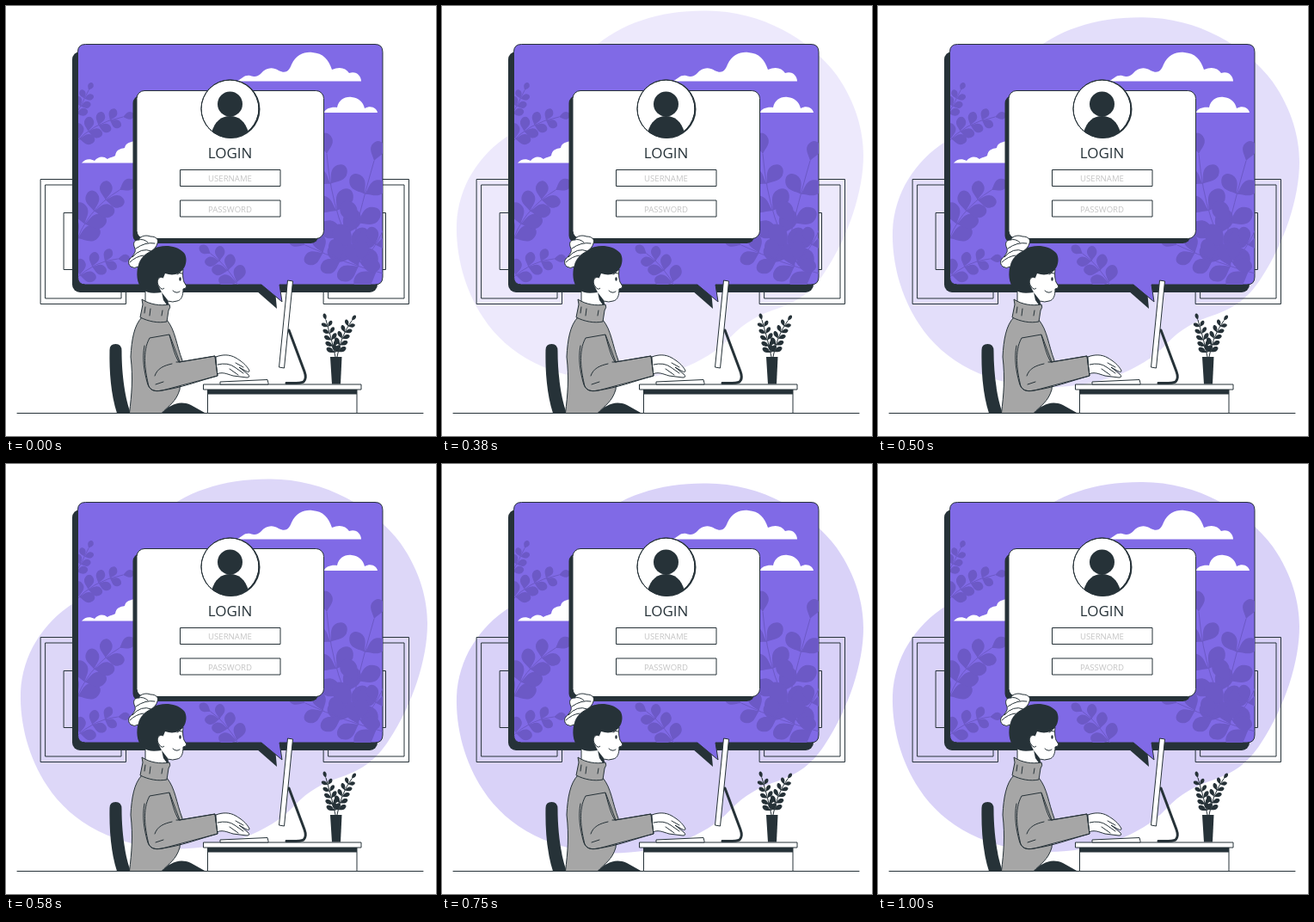
Animation of 500 by 500 pixels, one loop 1040 ms. Source, as an HTML page:

```html
<!DOCTYPE html>
<html lang="en">
<head>
<meta charset="utf-8">
<title>Login</title>
<style>
  html, body { margin: 0; width: 100%; height: 100%; overflow: hidden; background: #fff; }
  svg { display: block; width: 100%; height: 100%; }
  text { font-family: "Open Sans", "Noto Sans", sans-serif; font-stretch: 75%; text-anchor: middle; }
  .line { fill: none; stroke: #263238; stroke-linecap: round; stroke-linejoin: round; }
  .paper { fill: #fff; stroke: #263238; stroke-linejoin: round; }
  .wool { fill: #a6a6a6; stroke: #263238; stroke-linejoin: round; }
  .dark { fill: #263238; }
  .hint { font-size: 9.6px; fill: #c4c4c4; }
</style>
</head>
<body>
<svg viewBox="0 0 500 500">
  <defs>
    <clipPath id="screenClip"><rect x="84" y="45" width="354" height="279" rx="9"/></clipPath>
    <clipPath id="avatarClip"><circle cx="260.5" cy="119.5" r="33.5"/></clipPath>
  </defs>

  <path id="blob" fill="#806ae6" d="M305 21C370 20 428 54 459 96C482 129 490 162 490 189C490 230 473 283 445 325C430 348 414 359 391 367C369 374 352 383 335 401C306 432 255 451 198 451C128 450 76 421 48 378C26 345 16 305 17 269C19 225 43 188 79 165C121 139 143 98 175 65C207 36 252 21 305 21Z"/>

  <g class="line">
    <path d="M40.5 201.5h99v145h-99zM46 208h88v132h-88zM67.500 240.500h46v66h-46z"/>
    <path d="M369.500 201.500h99v145h-99zM375 208h88v132h-88zM395.500 240.500h46v66h-46z"/>
    <path d="M13 473.500H485"/>
  </g>

  <rect class="dark" x="77" y="53" width="355" height="280" rx="9"/>
  <path class="dark" d="M291 331L315 352L313 331Z"/>
  <path fill="#806ae6" stroke="#263238" d="M92.500 44.500H429Q438 44.500 438 53.500V315Q438 324 429 324H318L321 344L297 324H92.500Q83.500 324 83.500 315V53.500Q83.500 44.500 92.500 44.500Z"/>

  <g clip-path="url(#screenClip)">
    <g id="foliage" fill="#6c59c6" stroke="#6c59c6"></g>
    <g fill="#fff">
      <path d="M269 87.500C275 84 277 80 284 81C290 83 292 82 296 79C303 71 310 71 317 75C325 79 329 76 332 68C337 57 347 53 356 54C369 55 375 62 379 74C388 70 395 72 399 78C407 75 413 81 413 87.500Z"/>
      <path d="M370 124C371 119 379 117 385 118C387 109 394 105 402 106C410 107 415 111 417 119C425 115 431 119 432 124Z"/>
      <path d="M88 182.500C92 178 97 177 103 180C107 175 113 174 118 178C122 175 125 176 127 174C128 167 133 166 138 165C139 159 145 158 153 156V182.500Z"/>
    </g>
  </g>

  <rect class="dark" x="147.500" y="104" width="216" height="172" rx="9"/>
  <rect class="paper" x="152" y="98.500" width="217.500" height="172" rx="9"/>
  <circle class="dark" cx="261.500" cy="120" r="34"/>
  <circle class="paper" cx="260.500" cy="119.500" r="33.500"/>
  <g class="dark" clip-path="url(#avatarClip)">
    <circle cx="260.500" cy="114" r="14.500"/>
    <path d="M239 156V147C243 134 250 128 260.500 128S278 134 282 147V156Z"/>
  </g>
  <circle class="line" cx="260.500" cy="119.500" r="33.500"/>
  <text x="260.500" y="177" font-size="17" fill="#263238">LOGIN</text>
  <path class="paper" d="M202.500 190.500H319V209.500H202.500ZM202.500 226H319V245H202.500Z"/>
  <text class="hint" x="260.500" y="204">USERNAME</text>
  <text class="hint" x="260.500" y="239.500">PASSWORD</text>

  <path class="dark" d="M120.500 400Q120.500 393 127.500 393Q134.500 393 134.500 401C134.500 430 139 458 145 473.500H129C122 451 120 426 120.500 400Z"/>

  <!-- Desk -->
  <path class="paper" d="M234.500 446H408V473.500H234.500Z"/>
  <path class="dark" d="M234.500 446H408V451.500H234.500Z"/>
  <path class="paper" d="M229.500 440H413V446H229.500Z"/>
  <path class="line" stroke-width="3" d="M329 377L347 425Q350 433 346 437Q343 439 326 438.500"/>
  <path class="paper" d="M327.500 319L333.500 320L323.500 421L317.500 420Z"/>
  <path class="dark" d="M377 408H390.500L389 439.500H379Z"/>
  <g id="plant" class="dark" stroke="#263238"></g>

  <!-- Person -->
  <path class="dark" d="M180 473.500C191 464 201 458 215 464L232 473.500Z"/>
  <path class="paper" d="M180 311L206 306C205 313 206 318 207 321L210 326Q209 329 206 329C206 337 204 342 199 343Q194 345 188 343L189 350H162V325Z"/>
  <path class="dark" d="M181 333L188 342L188 349L183 342Z"/>
  <path class="dark" d="M154 300C151 311 152 322 158 329C165 335 173 334 181 333L177 325C175 317 179 314 183 316L185 311C194 314 202 312 206 306C210 301 211 292 207 287C199 279 187 278 178 280C166 282 158 291 154 300Z"/>
  <path class="paper" d="M183 316C177 313 174 321 178 326Q181 331 184 328"/>
  <ellipse class="dark" cx="202.500" cy="317.500" rx="1.200" ry="2.200"/>
  <path class="line" d="M199 312Q202 309 205 311M194 331Q198 335 202 332"/>
  <path class="paper" d="M145 303C141 299 142 295 147 291C149 288 151 286 150 282C147 276 149 272 154 272C157 267 163 266 168 268C174 268 178 271 176 276C175 280 172 283 169 285C160 289 155 296 154 303Q149 306 145 303Z"/>
  <path class="line" d="M151 282Q162 274 173 276M154 272Q160 270 165 275M147 292Q157 280 169 285M144 298Q151 291 160 290"/>

  <path class="wool" d="M158 362C149 371 146 388 145 408C148 433 146 452 143.500 473.500H181C189 465 198 460 202 446L205 412C198 394 197 377 187 365Z"/>
  <path class="wool" d="M158 341C167 347 179 349 190 347Q192 350 189 354L187 367C177 369 166 367 156 362L159 347Z"/>
  <path class="line" d="M162 350L161 357M168 352L167 360M182 354L181 360"/>
  <path class="paper" d="M244 408C252 405 260 405 267 409C274 413 280 418 283 424Q283 427 278 424L271 420L281 428Q285 432 280 432L264 430C257 428 252 425 245 428Z"/>
  <path class="line" d="M246 417Q258 414 266 420L276 427M260 422L270 429M267 415L276 420"/>
  <path class="wool" stroke="none" d="M167 386C158 402 162 424 165 438C166 447 173 449 182 447L246 430L243 407L202 414L190 382Z"/>
  <path class="line" d="M161 395C158 410 161 426 164 437C166 446 171 449 181 447C204 444 224 436 246 430L243 407L201 414C195 404 193 392 190 383M173 430C176 421 184 418 193 416M198 414L202 414M174 440L183 437"/>
  <path class="paper" d="M249 437L304 434.500L305 438.500V440H249Z"/>
</svg>
<script>
const LOOP = 1040, FPS = 24, DURATION = 1000, RISE = 30;
const blob = document.getElementById("blob");

function leaf(x, y, angle, len, fat) {
  const w = len * fat;
  return `<path stroke="none" transform="translate(${x} ${y}) rotate(${angle})"
    d="M0 0C${len * .25} ${-w * .35} ${len * .4} ${-w} ${len * .7} ${-w * .85}C${len * 1.1} ${-w * .5} ${len * 1.1} ${w * .5} ${len * .7} ${w * .85}C${len * .4} ${w} ${len * .25} ${w * .35} 0 0Z"/>`;
}

// A curved stem with paired leaves that shrink towards the tip.
function branch([ax, ay, bx, by, cx, cy], pairs, len, fat = .38, spread = 48) {
  let out = `<path fill="none" d="M${ax} ${ay}Q${bx} ${by} ${cx} ${cy}"/>`;
  for (let i = 0; i <= pairs; i++) {
    const t = .12 + .88 * i / pairs, u = 1 - t;
    const x = u * u * ax + 2 * u * t * bx + t * t * cx;
    const y = u * u * ay + 2 * u * t * by + t * t * cy;
    const angle = Math.atan2(u * (by - ay) + t * (cy - by), u * (bx - ax) + t * (cx - bx)) * 180 / Math.PI;
    const size = len * (1 - .3 * t);
    const turns = i === pairs ? [0] : [-spread, spread];
    out += turns.map(turn => leaf(x, y, angle + turn, size, fat)).join("");
  }
  return out;
}

document.getElementById("foliage").innerHTML = [
  branch([80, 128, 88, 115, 96, 98], 3, 14),
  branch([80, 160, 100, 136, 136, 129], 4, 19),
  branch([80, 280, 92, 238, 132, 214], 4, 29),
  branch([80, 318, 104, 296, 130, 294], 3, 20),
  branch([272, 328, 256, 300, 238, 288], 3, 22),
  branch([415, 302, 380, 255, 373, 172], 4, 35),
  branch([400, 292, 408, 250, 428, 180], 3, 34),
  branch([442, 312, 395, 300, 348, 278], 4, 31),
  branch([405, 300, 430, 290, 444, 245], 2, 26)
].join("");

document.getElementById("plant").innerHTML =
  branch([383, 408, 379, 388, 372, 365], 5, 11, .3) +
  branch([385, 408, 389, 384, 402, 366], 5, 11, .3);

const bezier = (s, a, b) => 3 * (1 - s) ** 2 * s * a + 3 * (1 - s) * s * s * b + s ** 3;

function overshoot(x) {
  let low = 0, high = 1;
  for (let i = 0; i < 24; i++) {
    const mid = (low + high) / 2;
    if (bezier(mid, .36, .5) < x) low = mid; else high = mid;
  }
  return bezier(low, -.01, 1.38);
}

function draw(ms) {
  const step = Math.min(FPS, Math.floor((ms % LOOP + 4) * FPS / 1000));
  const p = overshoot(step * 1000 / FPS / DURATION);
  blob.setAttribute("transform", `translate(0 ${RISE * (p - 1)})`);
  blob.setAttribute("opacity", .3 * Math.max(0, Math.min(1, p)));
}

const start = performance.now();
function tick() {
  draw(performance.now() - start);
  requestAnimationFrame(tick);
}
tick();
</script>
</body>
</html>
```
